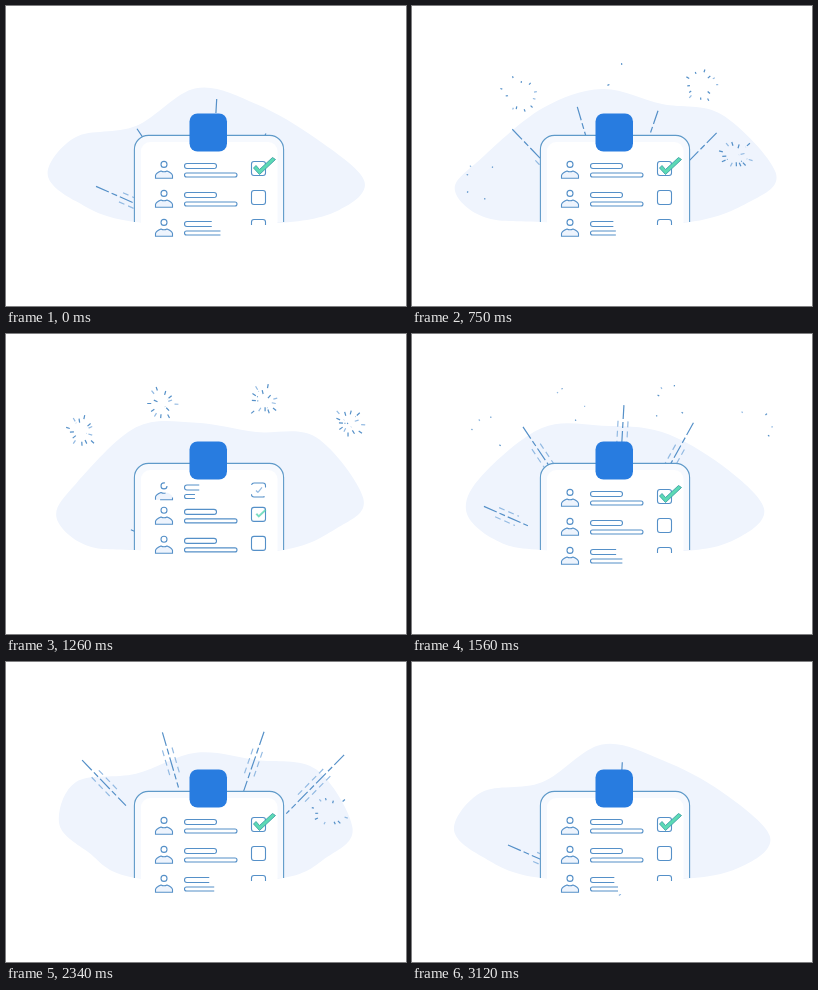
An HTML page with a canvas for the animation above (3.15 s loop, 400 by 300 pixels).

```html
<!DOCTYPE html>
<html lang="en">
<head>
<meta charset="utf-8">
<title>Checklist fireworks</title>
<style>
html, body { margin: 0; width: 100%; height: 100%; overflow: hidden; background: #fff; }
canvas { display: block; }
</style>
</head>
<body>
<canvas id="stage" width="400" height="300"></canvas>
<script>
const c = document.getElementById('stage').getContext('2d');
const LOOP = 3150, CYCLE = LOOP / 4, STEP = 30;
const TRAVEL = 540, LAG = 270, LIFE = 600, REPEAT = 1400;
const PITCH = 29, FIRST = 163;
const LINE = '#5590c8', PALE = '#93bae2';

const clamp = v => Math.max(0, Math.min(1, v));
const mix = (a, b, k) => a + (b - a) * k;
const easeOut = v => 1 - (1 - v) ** 2;
const easeInOut = v => v < .5 ? 2 * v * v : 1 - 2 * (1 - v) ** 2;
const mod = (a, n) => (a % n + n) % n;
const noise = n => mod(Math.sin(n * 12.9898) * 43758.5453, 1);

// All rockets rise from one point behind the card.
const ORIGIN = { x: 203, y: 230 };
const rockets = [
  { x: 212, y: 70, time: 205 },
  { x: 71, y: 172, time: 205 },
  { x: 107, y: 87, time: 270 },
  { x: 288, y: 77, time: 310 },
  { x: 324, y: 149, time: 500 },
  { x: 75, y: 97, time: 990 },
  { x: 156, y: 69, time: 990 },
  { x: 259, y: 67, time: 1010 },
  { x: 342, y: 89, time: 1030 }
];

// The outline breathes: each key point swings around its rest position.
function drawBlob(t) {
  const wave = (rest, swing, peak, turns = 1) =>
    rest + swing * Math.cos(2 * Math.PI * turns * (t - peak) / LOOP);
  const left = wave(48, 8, 1900), leftY = wave(172, 12, 1000);
  const right = wave(355, 9, 600), rightY = wave(170, 9, 250, 2);
  const pts = [
    [left, leftY],
    [70, wave(136, 17, 940)],
    [130, wave(107, 14, 2950)],
    [190, wave(87, 6, 1900)],
    [250, 98],
    [310, wave(119, 25, 250, 2)],
    [right, rightY],
    [right - 25, rightY + 29],
    [270, 217],
    [130, 216],
    [left + 28, leftY + 28]
  ];
  const at = j => pts[mod(j, pts.length)];
  c.save();
  c.beginPath();
  c.rect(0, 0, 400, 217);
  c.clip();
  c.beginPath();
  c.moveTo(left, leftY);
  pts.forEach((p, j) => {
    const a = at(j - 1), q = at(j + 1), b = at(j + 2);
    c.bezierCurveTo(p[0] + (q[0] - a[0]) / 6, p[1] + (q[1] - a[1]) / 6,
      q[0] - (b[0] - p[0]) / 6, q[1] - (b[1] - p[1]) / 6, q[0], q[1]);
  });
  c.fillStyle = '#eff4fd';
  c.fill();
  c.restore();
}

function line(x1, y1, x2, y2, color = LINE, dash = []) {
  c.beginPath();
  c.setLineDash(dash);
  c.moveTo(x1, y1);
  c.lineTo(x2, y2);
  c.strokeStyle = color;
  c.lineWidth = 1.2;
  c.stroke();
  c.setLineDash([]);
}

function drawTrail(x, y, age) {
  const dx = x - ORIGIN.x, dy = y - ORIGIN.y, length = Math.hypot(dx, dy);
  const reach = a => length * easeOut(clamp(1 + a / TRAVEL));
  const head = reach(age), tail = reach(age - LAG);
  if (head - tail < 1) return;
  c.save();
  c.translate(ORIGIN.x, ORIGIN.y);
  c.rotate(Math.atan2(dy, dx));
  line(head, 0, tail, 0, LINE, [14, 3, 6, 3]);
  for (const side of [-5, 5])
    line(mix(head, tail, .3), side, mix(head, tail, .75), side, PALE, [6, 4]);
  c.restore();
}

function drawBurst(x, y, p, seed) {
  const rays = 13, spread = easeOut(clamp(p * 1.3 + .2));
  for (let i = 0; i < rays; i++) {
    const r = noise(seed * 31 + i), s = noise(seed * 57 + i);
    if (s < (p - .6) * 1.8) continue;
    const angle = (i + r * .7) / rays * 2 * Math.PI;
    const outer = mix(9, 20, s) * spread;
    const inner = Math.max(outer * .2, outer - mix(13, 1.2, Math.sqrt(p)) * mix(.7, 1.2, r));
    const dx = Math.cos(angle), dy = Math.sin(angle), drop = 3 * p * p;
    line(x + dx * outer, y + dy * outer + drop, x + dx * inner, y + dy * inner + drop,
      i % 4 ? LINE : PALE, [4, 1.5]);
  }
}

function drawRockets(t) {
  rockets.forEach(({ x, y, time }, i) => {
    for (const burst of [time, time + REPEAT]) {
      const age = mod(t - burst + TRAVEL, LOOP) - TRAVEL;
      if (age < LAG) drawTrail(x, y, age);
      if (age >= 0 && age < LIFE) drawBurst(x, y, age / LIFE, i + 1);
    }
  });
}

function box(x, y, w, h, r) {
  c.beginPath();
  c.roundRect(x, y, w, h, r);
}

function drawCard() {
  c.beginPath();
  c.moveTo(128.4, 216);
  c.arcTo(128.4, 129.4, 200, 129.4, 14);
  c.arcTo(277.6, 129.4, 277.6, 216, 14);
  c.lineTo(277.6, 216);
  c.fillStyle = '#f6f9fe';
  c.fill();
  c.strokeStyle = '#5f9ac9';
  c.lineWidth = 1.1;
  c.stroke();
  box(135, 136, 136.5, 96, [9, 9, 0, 0]);
  c.fillStyle = '#fff';
  c.fill();
}

function drawPerson() {
  c.beginPath();
  c.arc(158, -4.6, 3, 0, 7);
  c.stroke();
  c.beginPath();
  c.moveTo(149.5, 9.3);
  c.lineTo(149.5, 6.5);
  c.quadraticCurveTo(150, 4, 155, 2);
  c.quadraticCurveTo(158, 3.6, 161, 2);
  c.quadraticCurveTo(166, 4, 166.5, 6.5);
  c.lineTo(166.5, 9.3);
  c.closePath();
  c.fillStyle = '#eef4fd';
  c.fill();
  c.stroke();
}

function drawBar(y, w, h, shown) {
  c.save();
  c.setLineDash([]);
  c.beginPath();
  c.rect(177, y - 2, (w + 3) * shown, h + 4);
  c.clip();
  box(178.5, y, w, h, h / 2);
  c.stroke();
  c.restore();
}

// shown: share of the bars that is visible; gone: how far the row has been erased
function drawRow(y, shown, gone) {
  c.save();
  c.translate(0, y);
  c.strokeStyle = LINE;
  c.lineWidth = 1.1;
  c.globalAlpha = 1 - clamp(gone * 2 - 1);
  if (gone) c.setLineDash([24 * (1 - gone), 24 * gone]);
  drawPerson();
  drawBar(-5.5, 32, 5, shown);
  drawBar(4, 52.5, 4, shown * shown);
  c.beginPath();
  c.rect(240, -20, 30, 239 - y);
  c.clip();
  box(245.5, -7.5, 14, 14, 2.5);
  c.stroke();
  c.restore();
}

function drawTick(y, scale, alpha) {
  c.save();
  c.translate(252, y);
  c.scale(scale, scale);
  c.globalAlpha = alpha;
  c.beginPath();
  [[-4.5, -1], [-2, -3.5], [1.5, .5], [14.5, -11.5], [17.5, -9.5], [1.5, 5.5]]
    .forEach(p => c.lineTo(...p));
  c.closePath();
  c.fillStyle = '#5cdab4';
  c.fill();
  c.strokeStyle = '#3fa0a8';
  c.lineWidth = .9 * scale;
  c.stroke();
  c.restore();
}

function drawList(t) {
  const phase = mod(t, CYCLE);
  const scroll = easeInOut(clamp((phase - 350) / 280));
  const grow = start => easeOut(clamp((phase - start) / 290));
  const leaving = FIRST - 17 * scroll;
  const rowY = i => FIRST + PITCH * (i - scroll);

  drawRow(leaving, clamp(1 - scroll * 1.4), scroll);
  drawRow(rowY(1), 1, 0);
  drawRow(rowY(2), grow(620 - CYCLE), 0);
  if (phase > 620) drawRow(rowY(3), grow(620), 0);

  if (phase < 430) drawTick(leaving, 1, 1 - clamp((phase - 370) / 60));
  else if (scroll < .8) {
    line(250, leaving, 252, leaving + 2, PALE);
    line(252, leaving + 2, 256, leaving - 3, PALE);
  }
  const tick = clamp((phase - 440) / 240);
  if (tick) drawTick(rowY(1), .45 + .55 * easeInOut(tick), clamp(.7 + tick));
}

function drawBadge() {
  box(183.5, 107.5, 37.5, 38, 8);
  c.fillStyle = '#287ce0';
  c.fill();
}

const start = performance.now();
function frame() {
  const t = Math.floor(mod(performance.now() - start, LOOP) / STEP) * STEP;
  c.clearRect(0, 0, 400, 300);
  drawBlob(t);
  drawRockets(t);
  drawCard();
  drawList(t);
  drawBadge();
  requestAnimationFrame(frame);
}
frame();
</script>
</body>
</html>
```
